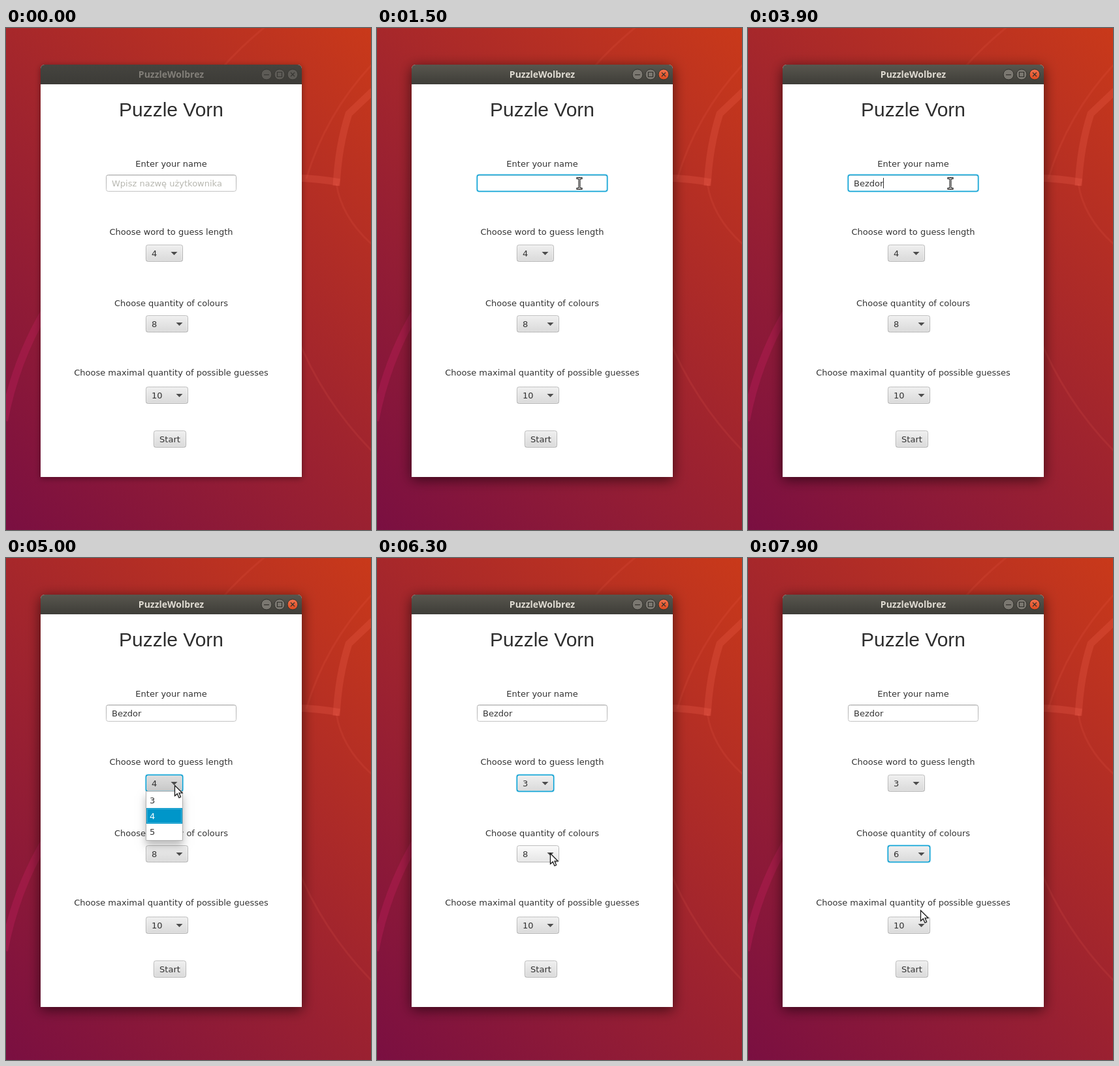
An HTML page with a canvas that plays this animation: 559 by 767 pixels, repeating every 8000 ms.

```html
<!DOCTYPE html>
<html lang="en">
<head>
<meta charset="utf-8">
<title>Puzzle Vorn</title>
<style>
html, body { margin: 0; width: 100%; height: 100%; overflow: hidden; }
canvas { display: block; }
</style>
</head>
<body>
<canvas id="stage" width="559" height="767"></canvas>
<script>
const ctx = document.getElementById('stage').getContext('2d');
const LOOP = 8000, STEP = 100;
const UI = '13px "DejaVu Sans", sans-serif';
const BLUE = '#0096c9', FOCUS = '#039ed3', INK = '#333';

const field = { x: 153, y: 224, w: 200, h: 26 };
const lengthBox = { x: 214, y: 331, w: 57, h: 26, items: [3, 4, 5] };
const colourBox = { x: 214, y: 439, w: 65, h: 26, items: [6, 7, 8, 9, 10] };
const guessBox = { x: 214, y: 548, w: 65, h: 26 };

const userName = 'Bezdor';
const keyTimes = [2100, 2600, 3000, 3300, 3600, 3900];

// Pointer path: time, x, y
const pointerPath = [
  [300, 461, 220], [500, 368, 230], [600, 325, 237], [700, 308, 237], [1100, 308, 237],
  [1200, 310, 237], [4100, 310, 237], [4400, 285, 302], [4600, 261, 357], [4700, 258, 347],
  [5000, 258, 347], [5400, 245, 369], [5700, 245, 369], [6300, 265, 451], [6900, 265, 451],
  [7100, 260, 466], [7300, 252, 478], [7400, 252, 478], [7900, 264, 538]
];

function pointerAt(t) {
  if (t < pointerPath[0][0]) return null;
  const next = pointerPath.findIndex(p => p[0] > t);
  if (next < 0) return pointerPath.at(-1).slice(1);
  const [t0, x0, y0] = pointerPath[next - 1], [t1, x1, y1] = pointerPath[next];
  const k = (t - t0) / (t1 - t0);
  return [Math.round(x0 + (x1 - x0) * k), Math.round(y0 + (y1 - y0) * k)];
}

const between = (t, a, b) => t >= a && t < b;
const inside = (p, b) => p && p[0] >= b.x && p[0] < b.x + b.w && p[1] >= b.y && p[1] < b.y + b.h;

function vertical(y, h, top, bottom) {
  const g = ctx.createLinearGradient(0, y, 0, y + h);
  g.addColorStop(0, top);
  g.addColorStop(1, bottom);
  return g;
}

function box(x, y, w, h, r, fill) {
  ctx.fillStyle = fill;
  ctx.beginPath();
  ctx.roundRect(x, y, w, h, r);
  ctx.fill();
}

function outline(x, y, w, h, r, color, width = 1) {
  ctx.strokeStyle = color;
  ctx.lineWidth = width;
  ctx.beginPath();
  ctx.roundRect(x, y, w, h, r);
  ctx.stroke();
}

function line(d, color, width) {
  ctx.strokeStyle = color;
  ctx.lineWidth = width;
  ctx.stroke(new Path2D(d));
}

function label(text, x, y, color = INK, font = UI, align = 'left') {
  ctx.font = font;
  ctx.textAlign = align;
  ctx.fillStyle = color;
  ctx.fillText(text, x, y);
}

function shadow(color, blur, dy) {
  ctx.shadowColor = color;
  ctx.shadowBlur = blur;
  ctx.shadowOffsetY = dy;
}

function drawWallpaper() {
  // 45 degree gradient through the stage centre
  const g = ctx.createLinearGradient(-52, 715, 611, 52);
  g.addColorStop(0, '#7a0f41');
  g.addColorStop(.5, '#a0242e');
  g.addColorStop(1, '#c9391a');
  ctx.fillStyle = g;
  ctx.fillRect(0, 0, 559, 767);
  const thin = 'rgba(255,110,90,.11)', thick = 'rgba(255,110,90,.2)';
  line('M330 62Q358 30 397 -2', thin, 3);
  line('M460 230Q490 130 562 54', thin, 3);
  line('M506 238Q514 290 562 332', thin, 3);
  line('M445 470Q485 570 562 648', thin, 3);
  line('M562 96L525 131Q509 180 506 241', thick, 11);
  line('M440 229Q480 230 511 236', thick, 11);
  line('M-3 600Q14 510 60 432', 'rgba(190,30,90,.38)', 12);
}

function drawWindow(active) {
  shadow(active ? 'rgba(0,0,0,.6)' : 'rgba(0,0,0,.4)', active ? 20 : 10, active ? 4 : 2);
  box(53, 56, 400, 630, [6, 6, 0, 0], '#fff');
  shadow('transparent', 0, 0);
  box(53, 56, 400, 30, [6, 6, 0, 0],
    active ? vertical(56, 30, '#58564e', '#3e3d38') : vertical(56, 30, '#45443f', '#3c3b37'));
  label('PuzzleWolbrez', 253, 76, active ? '#dfdbd2' : '#817e78',
    'bold 14px "Open Sans", sans-serif', 'center');

  const rim = active ? '#32312d' : '#383733';
  const glyphs = ['M395 71.5h8', 'M415.5 67.5h7v7h-7z', 'M436 68l6 6m0 -6l-6 6'];
  glyphs.forEach((glyph, i) => {
    ctx.beginPath();
    ctx.arc(399 + 20 * i, 71, 8, 0, 2 * Math.PI);
    ctx.fillStyle = !active ? '#5d5b56' : i < 2 ? '#7b7871' : vertical(63, 16, '#f37450', '#dd4a1e');
    ctx.fill();
    ctx.strokeStyle = rim;
    ctx.lineWidth = 1;
    ctx.stroke();
    line(glyph, rim, 1.2);
  });
}

function drawLabels() {
  label('Puzzle Vorn', 253, 135, '#2e2e2e', '30px "Liberation Sans", sans-serif', 'center');
  label('Enter your name', 253, 212, INK, UI, 'center');
  label('Choose word to guess length', 253, 316, INK, UI, 'center');
  label('Choose quantity of colours', 253, 425, INK, UI, 'center');
  label('Choose maximal quantity of possible guesses', 253, 531, INK, UI, 'center');
}

function focusRing({ x, y, w, h }) {
  outline(x - .5, y - .5, w + 1, h + 1, 3.5, 'rgba(3,158,211,.15)', 2);
  outline(x + .4, y + .4, w - .8, h - .8, 3, FOCUS, 1.5);
}

function drawField(t) {
  const { x, y, w, h } = field;
  const focused = between(t, 1000, 4900);
  box(x, y, w, h, 3, '#fff');
  if (focused) {
    focusRing(field);
  } else {
    outline(x + .5, y + .5, w - 1, h - 1, 3, vertical(y, h, '#acacac', '#c4c4c4'));
  }
  line(`M${x + 2} ${y + 1.5}h${w - 4}`, 'rgba(0,0,0,.09)', 1);

  if (t < 1000) {
    label('Wpisz nazwę użytkownika', 162, 242, '#b8b8b1');
    return;
  }
  const typed = userName.slice(0, keyTimes.filter(k => k <= t).length);
  label(typed, 162, 242);
  const caretOff = between(t, 1500, 1800) || t >= 4400;
  if (focused && !caretOff) {
    ctx.fillRect(Math.floor(162 + ctx.measureText(typed).width), 229, 1, 16);
  }
}

function drawButton(b, state) {
  const shades = {
    normal: ['#f0f0f0', '#d9d9d9'],
    hover: ['#fbfbfb', '#e5e5e5'],
    pressed: ['#dedede', '#c9c9c9']
  }[state];
  box(b.x, b.y, b.w, b.h, 3, vertical(b.y, b.h, ...shades));
  outline(b.x + 1.5, b.y + 1.5, b.w - 3, b.h - 3, 2, 'rgba(255,255,255,.4)');
  outline(b.x + .5, b.y + .5, b.w - 1, b.h - 1, 3, vertical(b.y, b.h, '#bcbcbc', '#adadad'));
}

function drawCombo(b, value, pointer, pressed, focused) {
  drawButton(b, pressed ? 'pressed' : inside(pointer, b) ? 'hover' : 'normal');
  if (focused) focusRing(b);
  label(value, b.x + 9, b.y + 18);
  ctx.fillStyle = '#4d4d4d';
  ctx.fill(new Path2D(`M${b.x + b.w - 18.5} ${b.y + 11}h10l-5 5z`));
}

function drawPopup(b, selected, pointer) {
  const top = b.y + b.h, height = 24 * b.items.length + 3;
  shadow('rgba(0,0,0,.28)', 12, 7);
  box(b.x, top, b.w, height, 0, '#fff');
  shadow('transparent', 0, 0);
  outline(b.x + .5, top - .5, b.w - 1, height, 0, '#b2b2b2');
  b.items.forEach((item, i) => {
    const row = { x: b.x + 1, y: top + 1 + 24 * i, w: b.w - 2, h: 24 };
    const lit = item === selected || inside(pointer, row);
    if (lit) box(row.x, row.y, row.w, row.h, 0, BLUE);
    if (item === selected) {
      outline(row.x + 1.5, row.y + 1.5, row.w - 3, row.h - 3, 0, 'rgba(255,255,255,.25)');
    }
    label(item, b.x + 6, row.y + 17, lit ? '#fff' : INK);
  });
}

function drawPointer(p) {
  ctx.save();
  ctx.translate(p[0], p[1]);
  if (inside(p, field)) {
    const beam = 'M-3 -7.5h2.5l.5 1l.5 -1h2.5M0 -7v15M-3 8.5h2.5l.5 -1l.5 1h2.5';
    ctx.lineCap = 'square';
    line(beam, '#000', 3);
    line(beam, '#fff', 1);
  } else {
    const arrow = new Path2D('M.5 .5V16.5L4.3 13L7 19.2L9.6 18L7 12H12z');
    shadow('rgba(0,0,0,.3)', 2, 1);
    ctx.fillStyle = '#fff';
    ctx.fill(arrow);
    shadow('transparent', 0, 0);
    ctx.strokeStyle = '#111';
    ctx.lineWidth = 1.2;
    ctx.stroke(arrow);
  }
  ctx.restore();
}

function draw(t) {
  const pointer = pointerAt(t);
  const lengthOpen = between(t, 5000, 5800), colourOpen = between(t, 6700, 7500);
  drawWallpaper();
  drawWindow(t >= 900);
  drawLabels();
  drawField(t);
  drawCombo(lengthBox, t < 5800 ? 4 : 3, pointer, between(t, 4900, 5800), between(t, 4900, 6600));
  drawCombo(colourBox, t < 7500 ? 8 : 6, pointer, between(t, 6600, 7500), t >= 6600);
  drawCombo(guessBox, 10, pointer);
  drawButton({ x: 226, y: 615, w: 50, h: 26 }, 'normal');
  label('Start', 251, 633, INK, UI, 'center');
  if (lengthOpen) drawPopup(lengthBox, 4, pointer);
  if (colourOpen) drawPopup(colourBox, 8, pointer);
  if (pointer) drawPointer(pointer);
}

function tick() {
  draw(Math.floor(performance.now() % LOOP / STEP) * STEP);
  requestAnimationFrame(tick);
}
tick();
</script>
</body>
</html>
```
